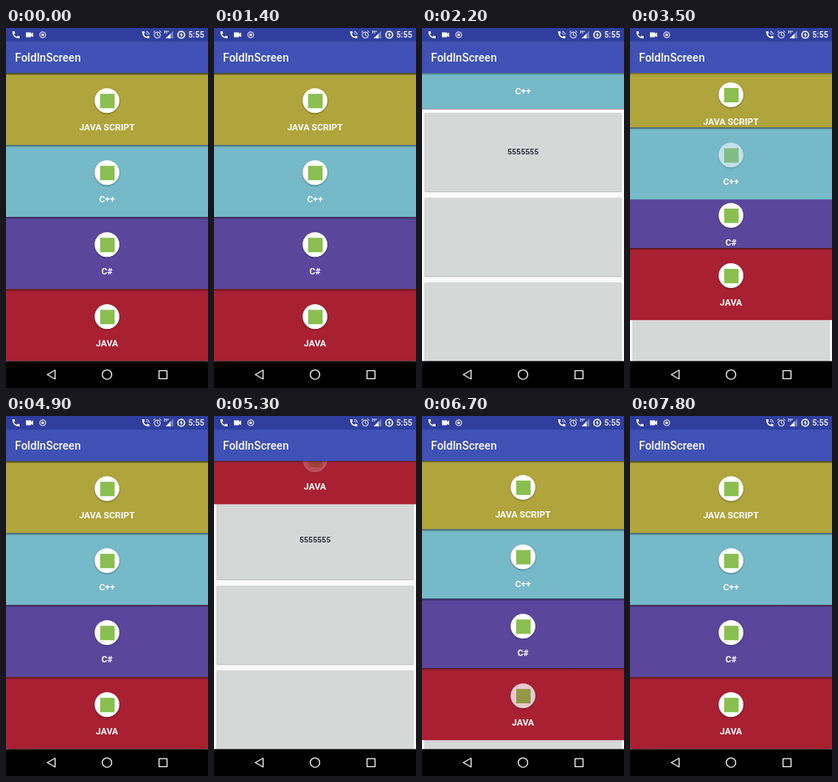
An HTML page that plays this animation: 253x450 px, repeating every 8 s.

```html
<!DOCTYPE html>
<html lang="en">
<head>
<meta charset="utf-8">
<title>Sliding cards</title>
<style>
  html, body { margin: 0; width: 100%; height: 100%; overflow: hidden; background: #000; }
  #stage { position: absolute; left: 0; top: 0; width: 253px; height: 450px; overflow: hidden;
    background: #fafafa; font-family: Roboto, "Noto Sans", sans-serif; }
  .panel { position: absolute; left: 3px; width: 247px; height: 98px; border-radius: 1.5px;
    background: #d6d7d7; box-shadow: 0 1px 1.5px rgba(0,0,0,.28);
    font: 500 9.84px/98px Roboto, "Noto Sans", sans-serif; color: #15151f; text-align: center; }
  .card { position: absolute; left: 0; top: 0; width: 253px; height: 90px; }
  .card::before { content: ""; position: absolute; left: 0; top: 0; width: 100%; height: 3px;
    background: linear-gradient(rgba(0,0,0,.55), transparent); }
  .icon { position: absolute; left: 111px; top: 19px; width: 31px; height: 31px;
    border-radius: 50%; background: #fff; box-shadow: 0 1px 2px rgba(0,0,0,.35); }
  .icon::after { content: ""; position: absolute; left: 6.5px; top: 7px; width: 18px; height: 18px;
    background: #8abf50; }
  .label { position: absolute; top: 58.6px; width: 100%; text-align: center; color: #fff;
    font-weight: 700; font-size: 11.25px; line-height: 20px; }
  #bars { position: absolute; left: 0; top: 0; z-index: 9; }
</style>
</head>
<body>
<div id="stage">
  <svg id="bars" width="253" height="450" fill="#fff">
    <defs>
      <linearGradient id="shade" x2="0" y2="1">
        <stop stop-opacity=".4"/><stop offset="1" stop-opacity="0"/>
      </linearGradient>
      <path id="phone" d="M-4-4.500h2.200l.6 2.500-1.200 1.200q1.100 2.200 3.200 3.200L2 1.200l2.500.6V4Q4.500 4.500 4 4.500Q-4.500 4-4.500-4Z"/>
    </defs>
    <rect y="56" width="253" height="3" fill="url(#shade)"/>
    <rect width="253" height="56.250" fill="#3f51b5"/>
    <rect width="253" height="17" fill="#303f9f"/>

    <use href="#phone" x="12.500" y="8.500"/>
    <path d="M25 5.500h6.500v2l2.500-2v6l-2.500-2v2H25z"/>
    <circle cx="46" cy="8.500" r="3.700" fill="none" stroke="#fff"/>
    <circle cx="46" cy="8.500" r="1.700"/>
    <use href="#phone" x="175" y="8.500"/>
    <g fill="none" stroke="#fff">
      <path d="M175.500 4.300q3.500 0 4.200 4M175.500 6.500q1.700.2 2 1.800" stroke-width=".9"/>
      <circle cx="189.500" cy="8.800" r="3.800"/>
      <path d="M189.500 6.300v2.700l1.800 1.200M184.600 5.400l2.300-1.900M194.400 5.400l-2.300-1.900"/>
      <circle cx="219.500" cy="8.500" r="4.200" stroke-width="1.600"/>
    </g>
    <path d="M209.500 3.500v9.500H200z" fill-opacity=".35"/>
    <path d="M206 7v6h-6z"/>
    <path d="M220.500 5l-3 4h1.700l-.6 3 3-4h-1.700z"/>
    <text x="198" y="7" font-size="5.500" font-weight="700">H⁺</text>
    <text x="228.200" y="12.400" font-size="10.200" font-weight="500">5:55</text>
    <text x="11.300" y="42" font-size="14.060" font-weight="500">FoldInScreen</text>

    <rect y="416.400" width="253" height="34" fill="#000"/>
    <g fill="none" stroke="#f4f4f4" stroke-width="1.300" stroke-linejoin="round">
      <path d="M61.500 427.700v11l-9.800-5.500z"/>
      <circle cx="126.500" cy="433.200" r="5.900"/>
      <rect x="191.700" y="428.300" width="10" height="10"/>
    </g>
  </svg>
</div>
<script>
const LOOP = 8000, STEP = 100, DURATION = 500;
const TOP = 56.25, HEIGHT = 90, PILE = 11.25;
const stage = document.getElementById("stage");

function add(parent, cls, text = "") {
  const el = document.createElement("div");
  el.className = cls;
  el.textContent = text;
  parent.append(el);
  return el;
}

["5555555", "", ""].forEach((text, i) => {
  add(stage, "panel", text).style.top = 106 + i * 105.75 + "px";
});

const cards = [
  ["JAVA SCRIPT", "#b0a43c"],
  ["C++", "#76b9c8"],
  ["C#", "#5a479c"],
  ["JAVA", "#a82032"]
].map(([name, color]) => {
  const el = add(stage, "card");
  el.style.background = color;
  const icon = add(el, "icon");
  add(el, "label", name);
  return { el, icon };
});

const moves = [
  { card: 1, start: 1407, opens: true },
  { card: 1, start: 3222, opens: false },
  { card: 3, start: 4907, opens: true },
  { card: 3, start: 6317, opens: false }
];

// Cubic curve (.4, 0, .2, 1), solved for x by bisection
function ease(x) {
  let lo = 0, hi = 1;
  for (let n = 0; n < 20; n++) {
    const s = (lo + hi) / 2, r = 1 - s;
    if (1.2 * r * r * s + 0.6 * r * s * s + s ** 3 < x) lo = s; else hi = s;
  }
  return lo * lo * (3 - 2 * lo);
}

// The first opening pauses midway for 200 ms
function clock(ms) {
  const t = Math.floor(ms % LOOP / STEP) * STEP;
  return t > 1700 && t < 2300 ? Math.max(1700, t - 200) : t;
}

function draw(ms) {
  const t = clock(ms);
  const move = moves.filter(m => t >= m.start).pop();
  const p = move ? Math.min(1, (t - move.start) / DURATION) : 0;
  const eased = p < 1 ? ease(p) : 1;
  const open = !move ? 0 : move.opens ? eased : 1 - eased;
  const fade = !move ? 0 : move.opens ? p : 1 - p;

  cards.forEach(({ el, icon }, i) => {
    const picked = open > 0 && move.card === i;
    const rest = TOP + i * HEIGHT;
    el.style.transform = `translateY(${rest + (PILE - rest) * open}px)`;
    el.style.zIndex = picked ? 5 : i + 1;
    icon.style.opacity = picked ? 1 - fade : 1;
  });
}

const begin = performance.now();
function tick() {
  draw(performance.now() - begin);
  requestAnimationFrame(tick);
}
tick();
</script>
</body>
</html>
```
